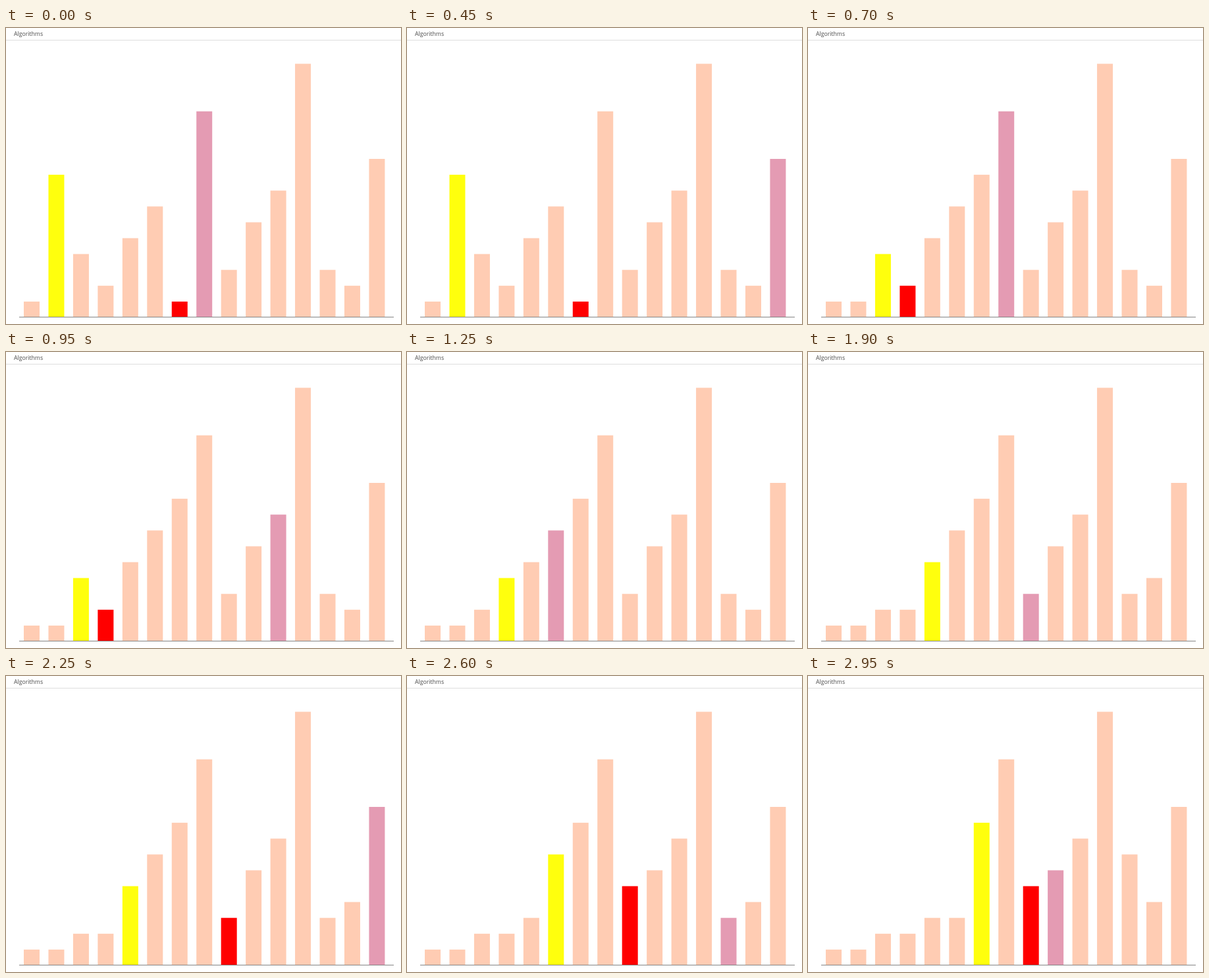
These frames come from a looping animation (600 px wide and 450 px high, 3 s). An HTML page with a canvas:

```html
<!DOCTYPE html>
<html lang="en">
<head>
<meta charset="utf-8">
<title>Selection sort</title>
<style>
  html, body { margin: 0; width: 100%; height: 100%; overflow: hidden; background: #fff; }
  canvas { display: block; position: absolute; left: 0; top: 0; }
  header {
    position: absolute; left: 12px; top: 3px;
    font: 8.7px/13px "Open Sans", "Noto Sans", sans-serif;
    color: #4c4c4c; white-space: nowrap;
  }
</style>
</head>
<body>
<canvas id="stage" width="600" height="450"></canvas>
<header>Algorithms</header>
<script>
  const ctx = document.getElementById('stage').getContext('2d');
  const LOOP = 3000, TICK = 50;
  const BASE = 440, UNIT = 24.1, LEFT = 27, PITCH = 37.46, WIDTH = 24;
  const COLORS = { bar: '#ffccb3', first: '#ffff0d', min: '#ff0000', scan: '#e49bb3' };
  const START = [1, 9, 4, 2, 5, 7, 1, 13, 3, 6, 8, 16, 3, 2, 10];

  // Pace of the sort: [tick, step] pairs, linear in between.
  const PACE = [[0, 0], [9, 7], [14, 12], [23, 18], [24, 20], [44, 40],
                [45, 40], [52, 47], [55, 49], [56, 50], [59, 52]];

  // Every comparison of the selection sort, from the second pass on.
  function sortSteps(values) {
    const a = values.slice(), steps = [];
    let min = 6, from = 7;
    for (let i = 1; i < a.length - 1; i++) {
      for (let j = from; j < a.length; j++) {
        steps.push({ a: a.slice(), i, j, min });
        if (a[j] < a[min]) min = j;
      }
      [a[i], a[min]] = [a[min], a[i]];
      min = i + 1;
      from = i + 2;
    }
    return steps;
  }

  const steps = sortSteps(START);

  function stepAt(tick) {
    const k = PACE.findIndex(p => p[0] >= tick);
    if (k < 1) return 0;
    const [t0, s0] = PACE[k - 1], [t1, s1] = PACE[k];
    return Math.round(s0 + (s1 - s0) * (tick - t0) / (t1 - t0));
  }

  function colorOf(n, s) {
    if (n === s.i) return COLORS.first;
    if (n === s.j) return COLORS.scan;
    if (n === s.min) return COLORS.min;
    return COLORS.bar;
  }

  function rect(color, x, y, w, h) {
    ctx.fillStyle = color;
    ctx.fillRect(x, y, w, h);
  }

  function draw(s) {
    rect('#fff', 0, 0, 600, 450);
    rect('#dedede', 0, 18, 600, 1);
    s.a.forEach((v, n) => {
      rect(colorOf(n, s), LEFT + n * PITCH, BASE - v * UNIT, WIDTH, v * UNIT);
    });
    rect('#858585', 20, BASE - 1, 569, 1);
  }

  function loop() {
    const tick = Math.floor((performance.now() % LOOP) / TICK);
    draw(steps[stepAt(tick)]);
    requestAnimationFrame(loop);
  }
  loop();
</script>
</body>
</html>
```
